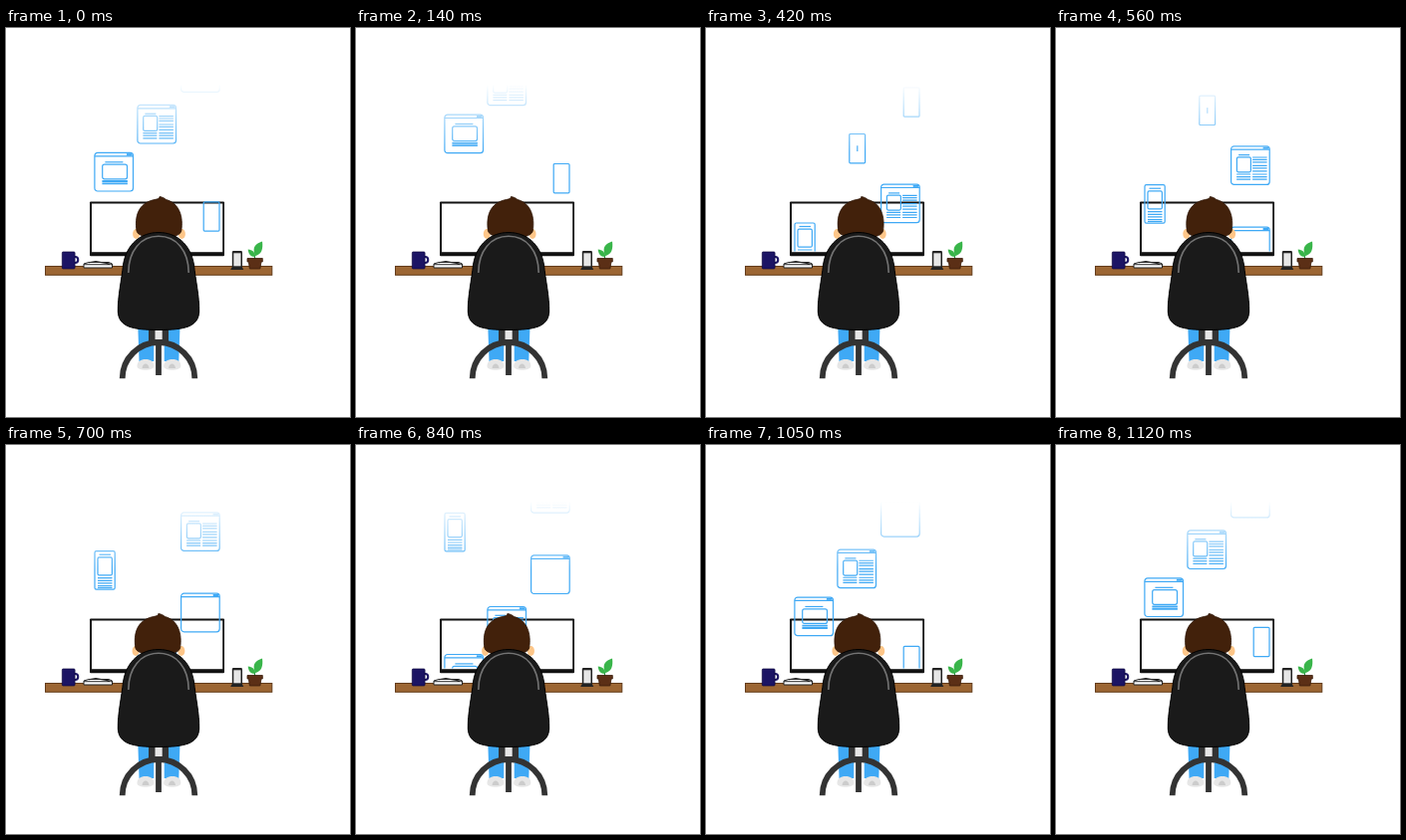
Recreate the animation shown at these times as an HTML page. Size 345 by 391 pixels, loop 1.19 s.

```html
<!DOCTYPE html>
<html lang="en">
<head>
<meta charset="utf-8">
<title>Desk</title>
<style>
html, body { margin: 0; width: 100%; height: 100%; overflow: hidden; background: #fff; }
svg { display: block; }
.wire { fill: none; stroke: #3fa9f5; stroke-width: 1.2; }
</style>
</head>
<body>
<svg width="345" height="391" viewBox="0 0 345 391">
  <defs>
    <linearGradient id="fade" gradientUnits="userSpaceOnUse" x1="0" y1="57" x2="0" y2="125">
      <stop offset="0" stop-color="#000"/>
      <stop offset="1" stop-color="#fff"/>
    </linearGradient>
    <mask id="top" maskUnits="userSpaceOnUse" x="80" y="57" width="140" height="167.5" style="mask-type:luminance;color-interpolation:sRGB">
      <rect x="80" y="57" width="140" height="167.5" fill="url(#fade)"/>
    </mask>
    <g id="window">
      <rect width="38.6" height="38.6" rx="3"/>
      <path d="M0 3.4H38.6"/>
      <path d="M32 1.8H37.5" stroke-width="2"/>
    </g>
    <g id="article">
      <use href="#window"/>
      <path d="M7.5 8.8H18.5"/>
      <rect x="5.8" y="11" width="14" height="15" rx="1.5"/>
      <path d="M21.5 11.2H36M21.5 13.6H36M21.5 16H36M21.5 19.6H36M21.5 22H36M21.5 25H36M5.5 28.2H19.5M21.5 28.2H36M5.5 30.8H19.5M21.5 30.8H36M5.5 33.4H19.5M21.5 33.4H36"/>
    </g>
    <g id="banner">
      <use href="#window"/>
      <path d="M10.5 9.4H28.5"/>
      <rect x="7.8" y="11.8" width="24.8" height="14.6" rx="2"/>
      <path d="M7.5 28.6H33M7.5 31H33" stroke-width="1.9"/>
    </g>
    <g id="tablet">
      <rect width="20.2" height="38.4" rx="1.6"/>
      <path d="M4.5 3.5H16"/>
      <rect x="3" y="6.2" width="14.4" height="18" rx="1.5"/>
      <path d="M3 27H17.5M3 29.6H17.5M3 32.2H17.5M3 34.8H17.5M3 36.6H17.5"/>
    </g>
    <rect id="phone" width="15.8" height="29.3" rx="1"/>
    <g id="dial">
      <use href="#phone"/>
      <path d="M8 11.8V17.6"/>
    </g>
  </defs>

  <!-- desk -->
  <rect x="39.5" y="239.5" width="227.3" height="8.8" fill="#9c6633" stroke="#633c1b"/>

  <!-- monitor -->
  <rect x="84" y="174.5" width="135" height="54.7" rx="1" fill="#111"/>
  <rect x="86" y="176.5" width="131.2" height="48.7" fill="#fff"/>

  <!-- mug and notepad -->
  <circle cx="69.3" cy="233" r="3" fill="none" stroke="#1b1464" stroke-width="2"/>
  <rect x="56.3" y="225" width="12.8" height="17" rx="1" fill="#1b1464" stroke="#0f0b40" stroke-width=".7"/>
  <path d="M78 237L83 235.5H103L106.5 237V241H78Z" fill="#fff" stroke="#222"/>
  <path d="M78 237.8H106M83 235.8L90 234.6L104 237" fill="none" stroke="#222" stroke-width="1.1"/>

  <!-- phone on its stand -->
  <rect x="226.8" y="224" width="10.2" height="17.6" rx="1.4" fill="#222"/>
  <rect x="228.3" y="226.3" width="7.2" height="13" fill="#e6e6e6"/>
  <path d="M226.5 240.5H237L238.3 243H225.2Z" fill="#222"/>

  <!-- plant -->
  <path d="M249.5 232C249 228 250.5 225 254 221" fill="none" stroke="#1f8a3a" stroke-width="1.2"/>
  <path d="M249.5 228C247 220 250 217 257 214.5C258 222 256.5 228 249.5 229Z" fill="#39b54a"/>
  <path d="M249.5 230C245 230 243 226.5 242.7 222.5C247 223 250 225 249.5 230Z" fill="#39b54a"/>
  <path d="M242 231.5H257.3V235H256L254.8 242H244.4L243.3 235H242Z" fill="#5b2f16" stroke="#3c1d0b" stroke-width=".8"/>

  <g id="screens" class="wire" mask="url(#top)"></g>

  <!-- head -->
  <g id="ears" fill="#fdc689">
    <ellipse cx="130.6" cy="207" rx="3.5" ry="5"/>
    <ellipse cx="176.4" cy="207" rx="3.5" ry="5"/>
  </g>
  <path id="hair" d="M131 204C129 190 132 176 149 172.5C152 172 154 171.5 154 169.5C157 170 159 171 160.5 172.5C174 176 178 190 175.8 204C174 214 133 214 131 204Z" fill="#42210b" stroke="#2c1506" stroke-width=".8"/>

  <!-- legs and shoes -->
  <path d="M132.3 300H148.3V335H133.5ZM158.7 300H174.5L173.3 335H158.7Z" fill="#3fa9f5"/>
  <g fill="#e6e6e6">
    <path d="M131.5 340C131.5 335 135 333 140 333S148.5 335 148.3 340C148 345 131.5 345 131.5 340Z"/>
    <path d="M158.2 340C158.2 335 162 333 167 333S175.5 335 175.3 340C175 345 158.2 345 158.2 340Z"/>
  </g>
  <path d="M136.5 342C137 336 143 336 143.5 342ZM163 342C163.5 336 169.5 336 170 342Z" fill="#ccc"/>

  <!-- chair -->
  <path d="M143 300H163V315H143Z" fill="#333"/>
  <path d="M149.5 300H156.7V313H149.5Z" fill="#e6e6e6"/>
  <path d="M116.7 352.3A36.3 36.3 0 0 1 189.3 352.3M153 314V349" fill="none" stroke="#333" stroke-width="5.8"/>
  <path d="M153 205.5C171 205.5 185 217 188.5 238C190 253 194 270 193.7 285C193 300 180 303.5 153 303.5S113 300 112.3 285C112 270 116 253 117.5 238C121 217 135 205.5 153 205.5Z" fill="#1a1a1a" stroke="#000"/>
  <path d="M122.8 246C122.8 224 135 209.3 153 209.3S183.2 224 183.2 246" fill="none" stroke="#737373" stroke-width="1.6"/>
</svg>
<script>
const LOOP = 1190, STEP = 70, SPAN = 327.6;
const byId = id => document.getElementById(id);

// shape, x, y at the start of the loop
const screens = [
  ['banner', 88.9, 125.4], ['tablet', 89, 310.9],
  ['article', 131.9, 77.4], ['dial', 143.8, 221.4],
  ['phone', 198.2, 174.8], ['article', 175.6, 272], ['window', 175.6, 353.4]
].map(([shape, x, y]) => {
  const node = document.createElementNS('http://www.w3.org/2000/svg', 'use');
  node.setAttribute('href', '#' + shape);
  byId('screens').append(node);
  return { node, x, y };
});

// steady climb with one quicker stretch mid-loop
const climb = i => 19.15 * i + 6.35 * Math.min(2, Math.max(0, i - 8));

const move = (node, x, y) => node.setAttribute('transform', `translate(${x} ${y})`);

function draw(now) {
  const i = Math.floor(now % LOOP / STEP);
  for (const { node, x, y } of screens) {
    move(node, x, (y - climb(i) + 50 + 2 * SPAN) % SPAN - 50);
  }
  const sway = Math.sin(2 * Math.PI * i * STEP / LOOP);
  move(byId('hair'), 2.2 * sway, 0);
  move(byId('ears'), sway, 0);
}

const start = performance.now();
function tick() {
  draw(performance.now() - start);
  requestAnimationFrame(tick);
}
tick();
</script>
</body>
</html>
```
